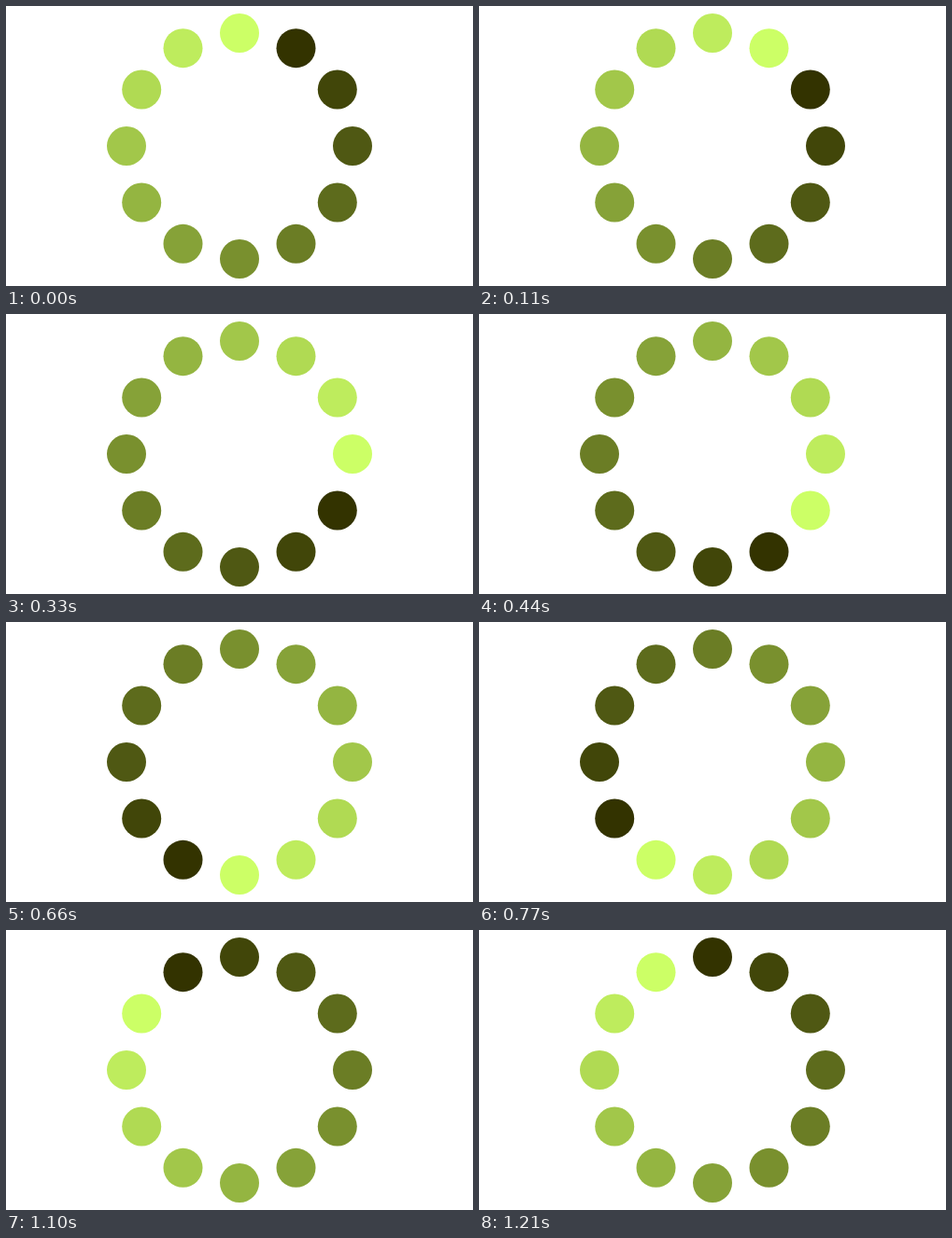
Animation, 500 px wide and 300 px high, one loop 1.32 s. Source, as an HTML page with a canvas:

```html
<!DOCTYPE html>
<html lang="en">
<head>
<meta charset="utf-8">
<title>Spinner</title>
<style>
html, body { margin: 0; width: 100%; height: 100%; overflow: hidden; background: #fff; }
canvas { display: block; }
</style>
</head>
<body>
<canvas id="stage" width="500" height="300"></canvas>
<script>
const ctx = document.getElementById("stage").getContext("2d");
const COUNT = 12, STEP = 110, RING = 121, DOT = 21;
const BRIGHT = [204, 255, 102], DARK = [51, 51, 0];

// Colour of the dot that trails the brightest one by `lag` places
function shade(lag) {
  const t = lag / (COUNT - 1);
  return `rgb(${BRIGHT.map((c, i) => Math.round(c + (DARK[i] - c) * t))})`;
}

function draw(time) {
  const head = Math.floor(time / STEP) % COUNT;
  ctx.fillStyle = "#fff";
  ctx.fillRect(0, 0, 500, 300);
  for (let i = 0; i < COUNT; i++) {
    const angle = i / COUNT * 2 * Math.PI;
    ctx.fillStyle = shade((head - i + COUNT) % COUNT);
    ctx.beginPath();
    ctx.arc(250 + RING * Math.sin(angle), 150 - RING * Math.cos(angle), DOT, 0, 2 * Math.PI);
    ctx.fill();
  }
}

const start = performance.now();
function tick() {
  draw(performance.now() - start);
  requestAnimationFrame(tick);
}
tick();
</script>
</body>
</html>
```
